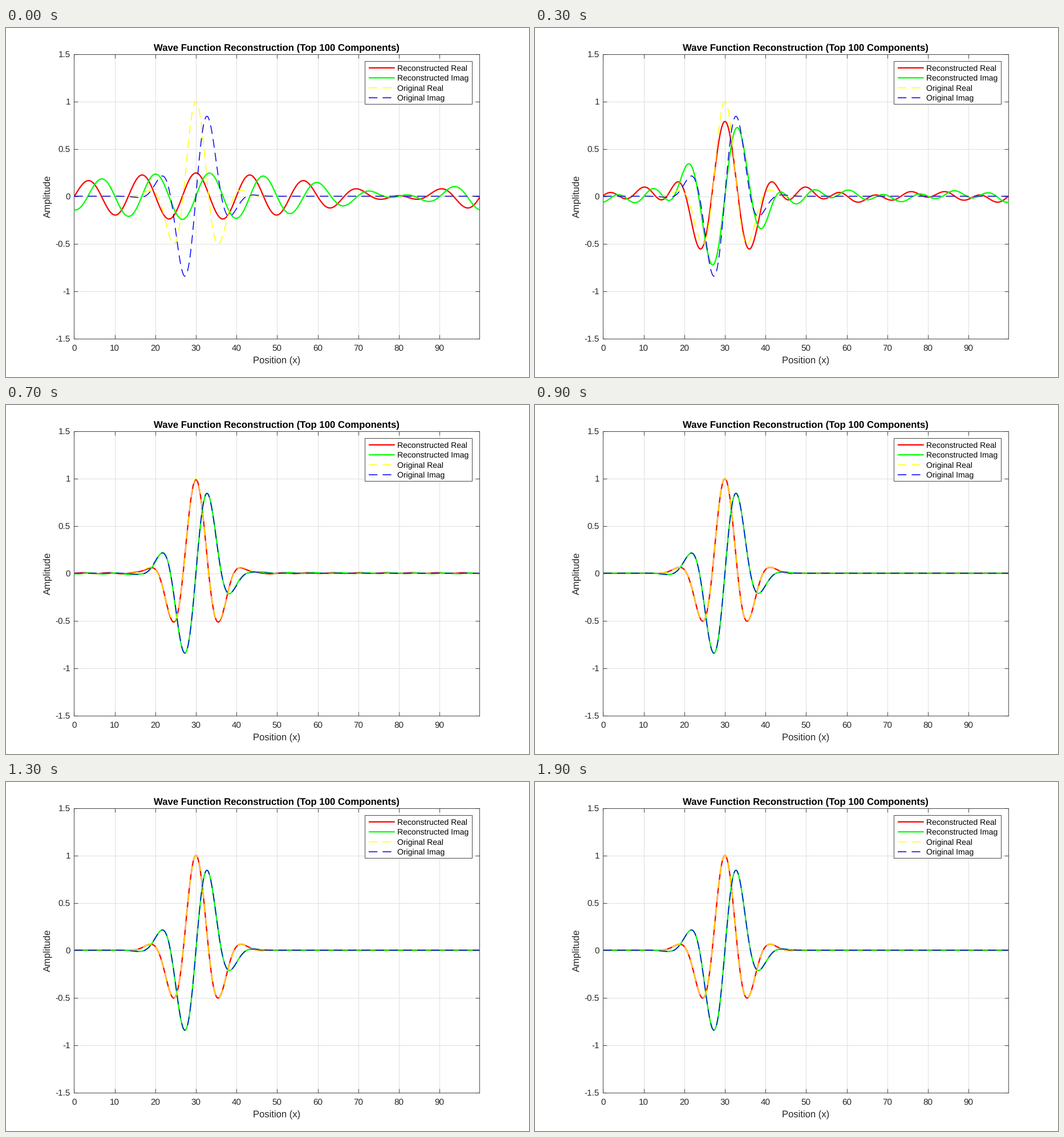
A matplotlib script that plays this animation: 917x611 px, repeating every 5000 ms.

```python
import numpy as np
import matplotlib.pyplot as plt
from matplotlib.animation import FuncAnimation
from matplotlib.patches import Rectangle

W, H, DPI = 917, 611, 64
PT = 72 / DPI                      # points per pixel
UNIT = 1.522 * PT                  # plot line-width unit
LEFT, RIGHT, TOP, BOTTOM = 119.49, 830.49, 45.51, 543.51
INK, GRID = "#262626", "#dfdfdf"
FRAMES, PER_FRAME = 50, 2

plt.rcParams.update({
    "font.family": "Liberation Sans",
    "text.hinting": "none",
    "path.simplify": False,
    "lines.dash_capstyle": "butt",
    "lines.solid_capstyle": "butt",
})

# Gaussian wave packet and its strongest Fourier components
N, LENGTH = 1000, 100.0
x = np.arange(N) * LENGTH / N
d = x - 30
packet = np.exp(-d**2 / (2 * 5**2) + 0.5j * d)
spectrum = np.fft.fft(packet)
order = np.argsort(-np.abs(spectrum))


def rebuild(count):
    """Sum of the strongest `count` components."""
    kept = np.zeros_like(spectrum)
    kept[order[:count]] = spectrum[order[:count]]
    return np.fft.ifft(kept)


fig = plt.figure(figsize=(W / DPI, H / DPI), dpi=DPI, facecolor="white")
ax = fig.add_axes([LEFT / W, 1 - BOTTOM / H,
                   (RIGHT - LEFT) / W, (BOTTOM - TOP) / H])
ax.set_xlim(0, x[-1])
ax.set_ylim(-1.5, 1.5)
ax.set_xticks(range(0, 100, 10))
ax.set_yticks(np.arange(-1.5, 1.6, 0.5))
ax.set_axisbelow(True)
ax.grid(color=GRID, lw=1 * PT)
ax.tick_params(direction="in", length=7 * PT, width=0.55 * UNIT, color=INK,
               top=True, right=True, labelbottom=False, labelleft=False)
for spine in ax.spines.values():
    spine.set(color=INK, linewidth=0.55 * UNIT)


def label(px, py, text, size, color=INK, **kw):
    """Text with its baseline at a pixel position counted from the top left."""
    fig.text(px / W, 1 - py / H, text, fontsize=size * PT, color=color,
             va="baseline", **kw)


for v in range(0, 100, 10):
    label(LEFT + v * (RIGHT - LEFT) / x[-1], 565.3, str(v), 15.2, ha="center")
for v in np.arange(-1.5, 1.6, 0.5):
    py = BOTTOM - (v + 1.5) / 3 * (BOTTOM - TOP)
    label(113, py + 5.6, f"{v:g}", 15.2, ha="right")
label(474.3, 39.6, "Wave Function Reconstruction (Top 100 Components)", 16.7,
      "black", ha="center", weight="bold")
label(474.8, 586.5, "Position (x)", 16.6, ha="center")
label(77.6, 294.3, "Amplitude", 16.7, ha="center", rotation=90,
      rotation_mode="anchor")

SOLID = dict(lw=1.5 * UNIT, ls="-")
DASHED = dict(lw=UNIT, ls=(0, (10, 6)))
STYLES = [
    ("Reconstructed Real", dict(color="#ff0000", **SOLID)),
    ("Reconstructed Imag", dict(color="#00ff00", **SOLID)),
    ("Original Real", dict(color="#ffff00", **DASHED)),
    ("Original Imag", dict(color="#0000ff", **DASHED)),
]
curves = [ax.plot(x, part, clip_on=False, zorder=3 + i, **style)[0]
          for i, (part, (_, style)) in enumerate(
              zip([0 * x, 0 * x, packet.real, packet.imag], STYLES))]

# Legend, laid out in pixels
key = fig.add_axes([0, 0, 1, 1], zorder=5)
key.set_xlim(0, W)
key.set_ylim(H, 0)
key.axis("off")
key.add_patch(Rectangle((629.49, 57.51), 188, 75, fc="white", ec=INK,
                        lw=0.55 * UNIT))
for i, (name, style) in enumerate(STYLES):
    row = 69.8 + 17.45 * i
    key.plot([636, 681.7], [row, row], snap=False, **style)
    key.text(685.5, row + 5, name, fontsize=13.95 * PT, color="black",
             va="baseline")


def draw(i):
    wave = rebuild(PER_FRAME * (i + 1))
    curves[0].set_ydata(wave.real)
    curves[1].set_ydata(wave.imag)
    return curves[:2]


anim = FuncAnimation(fig, draw, frames=FRAMES, interval=100, repeat=True,
                     repeat_delay=0, blit=False)
plt.show()
```
